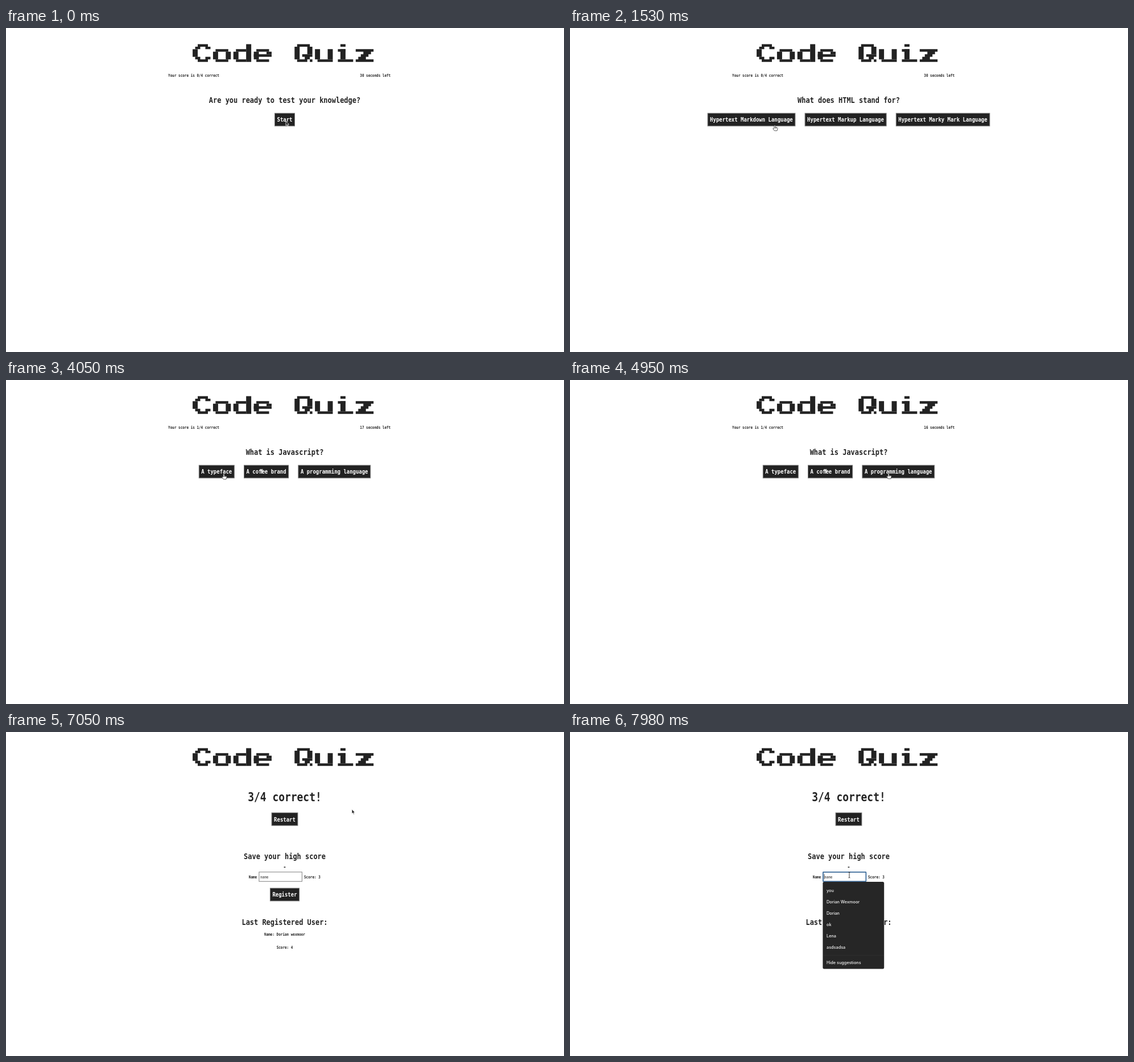
These frames come from a looping animation (981x571 px, 8000 ms). An HTML page:

```html
<!DOCTYPE html>
<html lang="en">
<head>
<meta charset="utf-8">
<title>Code Quiz</title>
<style>
  html, body { margin: 0; width: 100%; height: 100%; overflow: hidden; background: #fff; }
  svg { display: block; width: 100%; height: 100%; }
  text { font-family: "DejaVu Sans Mono", monospace; font-weight: bold; fill: #222; white-space: pre; font-variant-ligatures: none; }
  .hint { fill: #6c6c6c; }
  .light { fill: #fff; }
  .menu text { font: 500 7.3px Inter, sans-serif; fill: #f4f4f4; }
  .tight { letter-spacing: -2.7px; }
</style>
</head>
<body>
<svg id="stage" viewBox="0 0 981 571"></svg>
<script>
const LOOP = 8000, MID = 490, INK = '#222';
const stage = document.getElementById('stage');

function add(parent, tag, attrs = {}, content = '') {
  const el = document.createElementNS('http://www.w3.org/2000/svg', tag);
  for (const [key, value] of Object.entries(attrs)) el.setAttribute(key, value);
  if (content) el.innerHTML = content;
  parent.append(el);
  return el;
}

function play(el, frames) {
  el.animate(frames, { duration: LOOP, iterations: Infinity });
}

function show(el, from, to = LOOP) {
  const at = (time, opacity) => ({ offset: time / LOOP, opacity, easing: 'step-end' });
  const last = to < LOOP ? 0 : 1;
  play(el, [at(0, from ? 0 : 1), at(from, 1), at(to, last), at(LOOP, last)]);
  return el;
}

// Tall terminal lettering; every cell is 0.4 of the nominal size wide.
function label(parent, content, x, y, size, anchor = 'start', cls = '') {
  return add(parent, 'text', {
    transform: `translate(${x} ${y}) scale(1 1.2)`,
    'font-size': size * 0.4 / 0.602, 'text-anchor': anchor, class: cls
  }, content);
}
const centered = (parent, content, y, size) => label(parent, content, MID, y, size, 'middle');

// A row of buttons centred on the stage.
function buttons(parent, names, y) {
  const cell = 5.4, gap = 16.2;
  const widths = names.map(n => (n.length - (n.includes('ff') ? 1 : 0)) * cell + 9);
  let x = MID - (widths.reduce((a, b) => a + b) + gap * (names.length - 1)) / 2;
  names.forEach((name, i) => {
    add(parent, 'rect', { x: x + .5, y: y + .5, width: widths[i] - 1, height: 22.6, fill: INK, stroke: '#777' });
    label(parent, name.replace('ff', '<tspan class="tight">ff</tspan>'), x + 4.5, y + 15.7, 13.5, 'start', 'light');
    x += widths[i] + gap;
  });
}

// Title: block letters on a 7 by 7 grid, as [thin strokes, thick strokes].
const letters = {
  C: ['M2 .5h4M1 1.5h2M5 1.5h2M1 5.5h2M5 5.5h2M2 6.5h4', 'M1 2v3'],
  o: ['M1 2.5h5M1 6.5h5', 'M1 3v3M6 3v3'],
  d: ['M1 2.5h4M1 6.5h4', 'M1 3v3M6 0v7'],
  e: ['M1 2.5h5M0 4.5h7M1 6.5h5', 'M1 3v3M6 3v1'],
  Q: ['M1 .5h5M3 4.5h4M4 5.5h2M1 6.5h4M6 6.5h1', 'M1 1v5M6 1v3'],
  u: ['M1 6.5h6', 'M1 2v4M6 2v4'],
  i: ['M1 2.5h3M1 6.5h6', 'M3 0v1M3 2v4'],
  z: ['M0 2.5h7M3 3.5h3M2 4.5h3M1 5.5h3M0 6.5h7', '']
};
const title = add(stage, 'g', {
  transform: 'translate(328.1 28.4) scale(4.48)', stroke: INK, fill: 'none', role: 'img', 'aria-label': 'Code Quiz'
});
[...'Code Quiz'].forEach((char, i) => (letters[char] || []).forEach((d, weight) =>
  add(title, 'path', { d, 'stroke-width': weight + 1, transform: `translate(${i * 8} 0)` })));

// Score and countdown
const DONE = 6300;
function series(steps, draw) {
  steps.forEach(([from, value], i) => show(draw(value), from, steps[i + 1]?.[0] ?? DONE));
}
series([[0, 0], [3690, 1], [5100, 2]], n =>
  label(stage, `Your score is ${n}/4 correct`, 285.1, 86.3, 9));
series([[0, 30], [1770, 29], [2550, 19], [2670, 18], [3570, 17], [4470, 16], [5370, 15], [6270, 14]], n =>
  label(stage, `${n} seconds left`, 676.2, 86.3, 9, 'end'));

// Questions
series([
  [0, ['Are you ready to test your knowledge?', 'Start']],
  [870, ['What does HTML stand for?', 'Hypertext Markdown Language', 'Hypertext Markup Language', 'Hypertext Marky Mark Language']],
  [2550, ['What does CSS stand for?', 'Cascading Stylesheet', 'Flowing Stylesheet', 'Shading Stylesheet']],
  [3690, ['What is Javascript?', 'A typeface', 'A coffee brand', 'A programming language']],
  [5100, ['What does DOM stand for?', 'Document Object Model', 'Document Thingamajig', 'Donut Object Mmmmmm']]
], ([question, ...answers]) => {
  const group = add(stage, 'g');
  centered(group, question, 131.8, 18);
  buttons(group, answers, 149.7);
  return group;
});

// Result page
const FOCUS = 7680;
const result = show(add(stage, 'g'), DONE);
centered(result, '3/4 correct!', 121.5, 27);
buttons(result, ['Restart'], 141.8);
centered(result, 'Save your high score', 223.6, 18);
centered(result, '-', 240.6, 13.5);
label(result, 'Name', 426.8, 258.1, 9);
add(result, 'rect', { x: 444.9, y: 246.8, width: 75.5, height: 16.5, fill: '#fff', stroke: '#808080' });
label(result, 'name', 447, 258.1, 9, 'start', 'hint');
label(result, 'Score: 3', 524, 258.1, 9);
buttons(result, ['Register'], 274.7);
centered(result, 'Last Registered User:', 339.8, 18);
centered(result, 'Name: Dorian wexmoor', 359.1, 9);
centered(result, 'Score: 4', 381.6, 9);

const focus = show(add(stage, 'g', { class: 'menu' }), FOCUS);
add(focus, 'rect', { x: 444.9, y: 246.8, width: 75.5, height: 16.5, rx: 1, fill: 'none', stroke: '#3f6f9f', 'stroke-width': 1.8 });
add(focus, 'path', { d: 'M447.2 250.5v9', stroke: INK, 'stroke-width': .8 });
add(focus, 'rect', { x: 444.4, y: 264, width: 107.8, height: 153.4, rx: 2.5, fill: '#262626' });
['you', 'Dorian Wexmoor', 'Dorian', 'ok', 'Lena', 'asdsadsa'].forEach((name, i) =>
  add(focus, 'text', { x: 451, y: 281.6 + i * 20.15 }, name));
add(focus, 'path', { d: 'M445 393.5h107', stroke: '#323232', 'stroke-width': .7 });
add(focus, 'text', { x: 451, y: 408.6 }, 'Hide suggestions');

// Pointer: [time, x, y] of its tip
const pointer = add(stage, 'g');
const route = [
  [0, 492, 164], [450, 492, 163], [960, 491, 163], [1470, 360, 171], [2100, 360, 170],
  [2550, 356, 167], [2700, 355, 167], [3720, 356, 167], [4050, 383, 165], [4260, 390, 165],
  [4800, 560, 164], [5160, 560, 164], [5760, 424, 152], [6060, 368, 163], [6510, 367, 163],
  [6870, 612, 134], [7050, 608, 136], [7290, 562, 178], [7530, 491, 247], [LOOP, 491, 247]
];
play(pointer, route.map(([time, x, y]) => ({
  offset: time / LOOP, transform: `translate(${x}px, ${y}px)`, easing: 'ease-in-out'
})));

const shapes = {
  arrow: { d: 'M0 0V8L1.8 6.4L3 9.3L4.4 8.7L3.2 6H5.5Z', fill: INK, stroke: '#fff', 'stroke-width': .8 },
  hand: {
    d: 'M-1 1Q0-.6 1 1V4L4 4.6Q5.2 5 5 6.5L4 10H-.6L-3.2 6.6Q-3.3 5-1 6Z M1 4V6M2.6 4.5V6',
    fill: '#fff', stroke: '#333', 'stroke-width': .8
  },
  beam: { d: 'M-1.5 0Q0 0 0 1Q0 0 1.5 0M0 1V9M-1.5 10Q0 10 0 9Q0 10 1.5 10', fill: 'none', stroke: INK, 'stroke-width': .9 }
};
[
  ['arrow', 0, 390], ['hand', 390, 5100], ['arrow', 5100, 5190], ['hand', 5190, 5690],
  ['arrow', 5690, 5800], ['hand', 5800, 6330], ['arrow', 6330, 7500], ['beam', 7500, LOOP]
].forEach(([name, from, to]) => show(add(pointer, 'path', shapes[name]), from, to));
</script>
</body>
</html>
```
